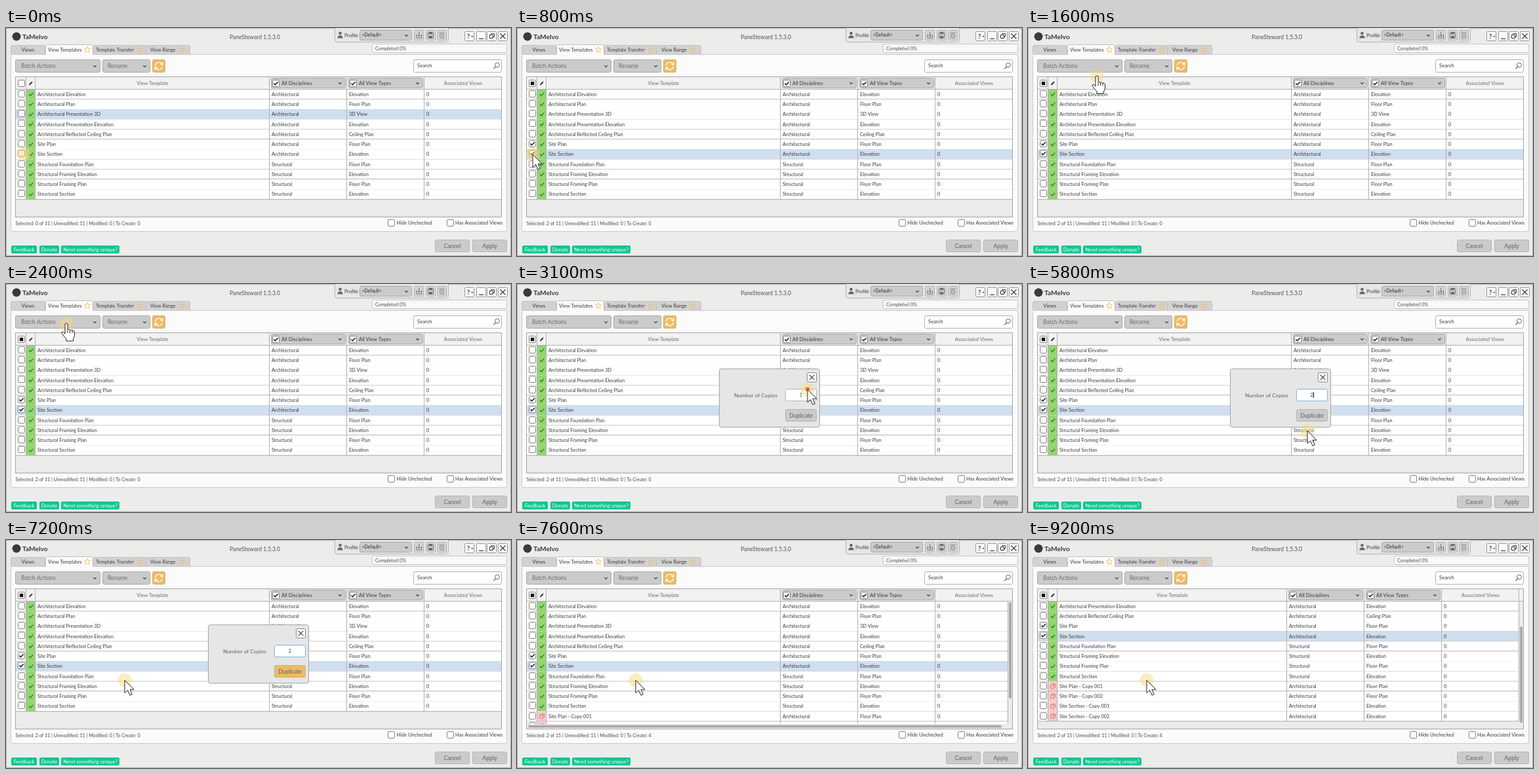
An HTML page with a canvas for the animation above (10000 ms loop, 770 px wide and 348 px high).

```html
<!DOCTYPE html>
<html lang="en">
<head>
<meta charset="utf-8">
<title>View templates</title>
<style>
  html, body { margin: 0; width: 100%; height: 100%; overflow: hidden; background: #ececeb; }
  canvas { display: block; }
</style>
</head>
<body>
<canvas id="stage" width="770" height="348"></canvas>
<script>
const ctx = document.getElementById('stage').getContext('2d');
const LOOP = 10000;
const GREY = '#cbcbcb', ORANGE = '#ecbb62', INK = '#3a3a3a', SOFT = '#6c6c6c', RULE = '#b0b0b0';

// Moments of the hard changes, in ms
const AT = {
  firstCheck: 300, secondCheck: 700, dialogOpen: 2600, focus: 3700, typing: 4200,
  typed: 4800, moveAgain: 5800, hoverDuplicate: 6100, submit: 6300, dialogClose: 7300,
  created: 7500, relayout: 7800, scrolled: 8200
};
const between = (t, from, to) => t >= from && t < to;

const names = [
  'Architectural Elevation', 'Architectural Plan', 'Architectural Presentation 3D',
  'Architectural Presentation Elevation', 'Architectural Reflected Ceiling Plan',
  'Site Plan', 'Site Section', 'Structural Foundation Plan', 'Structural Framing Elevation',
  'Structural Framing Plan', 'Structural Section', 'Site Plan - Copy 001',
  'Site Plan - Copy 002', 'Site Section - Copy 001', 'Site Section - Copy 002'
];
const SITE_PLAN = 5, SITE_SECTION = 6, EXISTING = 11, ROW = 15.27, BODY_TOP = 93.5;

const disciplineOf = name => name.startsWith('Structural') ? 'Structural' : 'Architectural';
const viewTypeOf = name =>
  /3D/.test(name) ? '3D View' :
  /Ceiling/.test(name) ? 'Ceiling Plan' :
  /Elevation|Section/.test(name) ? 'Elevation' : 'Floor Plan';

// Pointer path: time, x, y
const path = [
  [0, 27, 192], [250, 24, 178], [400, 24, 178], [600, 24, 193], [800, 24, 193],
  [1600, 105, 74], [1800, 92, 61], [2800, 92, 61], [3100, 443, 161], [3500, 443, 161],
  [3700, 438, 168], [5799, 438, 168], [5800, 426, 224], [6200, 432, 203],
  [6600, 432, 203], [7100, 181, 214], [LOOP, 181, 214]
];
const clicks = [AT.firstCheck, AT.secondCheck, 1850, 3050, AT.submit];

function pointerAt(t) {
  const i = path.findIndex(p => p[0] > t);
  const [t0, x0, y0] = path[i - 1], [t1, x1, y1] = path[i];
  const u = (t - t0) / (t1 - t0), k = u * u * (3 - 2 * u);
  return [x0 + (x1 - x0) * k, y0 + (y1 - y0) * k];
}

function text(str, x, y, size = 7.35, color = INK, align = 'left', weight = 400) {
  ctx.font = `${weight} ${size}px Lato, sans-serif`;
  ctx.fillStyle = color;
  ctx.textAlign = align;
  ctx.fillText(str, x, y + size * 0.36);
}

// Outlined boxes keep their 1px border inside the given size
function box(x, y, w, h, fill, stroke, radius = 0) {
  const inset = stroke ? 0.5 : 0;
  ctx.beginPath();
  ctx.roundRect(x + inset, y + inset, w - 2 * inset, h - 2 * inset, radius);
  if (fill) { ctx.fillStyle = fill; ctx.fill(); }
  if (stroke) { ctx.strokeStyle = stroke; ctx.lineWidth = 1; ctx.stroke(); }
}

function fillRect(x, y, w, h, color) {
  ctx.fillStyle = color;
  ctx.fillRect(x, y, w, h);
}

function line(points, color = INK, width = 1) {
  ctx.beginPath();
  points.forEach(([x, y]) => ctx.lineTo(x, y));
  ctx.strokeStyle = color;
  ctx.lineWidth = width;
  ctx.stroke();
}

function disc(x, y, r, color) {
  ctx.beginPath();
  ctx.arc(x, y, r, 0, Math.PI * 2);
  ctx.fillStyle = color;
  ctx.fill();
}

const tick = (x, y, color, width = 1.3) =>
  line([[x - 3, y], [x - 1, y + 2.3], [x + 3.2, y - 2.3]], color, width);
const chevron = (x, y) => line([[x - 2.3, y - 1.2], [x, y + 1.2], [x + 2.3, y - 1.2]], INK, 1.1);
const cross = (x, y, r) => {
  line([[x - r, y - r], [x + r, y + r]], '#333', 1.1);
  line([[x - r, y + r], [x + r, y - r]], '#333', 1.1);
};

function checkbox(x, y, state) {
  box(x - 5.5, y - 5.5, 11, 11, '#fff', '#808080', 1);
  if (state === 'some') fillRect(x - 2.7, y - 2.7, 5.4, 5.4, '#111');
  else if (state) tick(x, y, '#111', 1.4);
}

function button(label, x, y, w, h, size, fill = GREY) {
  box(x, y, w, h, fill, '#b4b4b4', 2);
  text(label, x + w / 2, y + h / 2, size, '#606060', 'center');
}

function combo(label, x, y, w, h, textX, size, color) {
  box(x, y, w, h, GREY, '#a8a8a8', 2);
  text(label, textX, y + h / 2, size, color);
  chevron(x + w - 8.5, y + h / 2 + 0.3);
}

function star(x, y) {
  ctx.beginPath();
  for (let i = 0; i < 10; i++) {
    const a = i * Math.PI / 5 - Math.PI / 2, r = i % 2 ? 2.2 : 4.8;
    ctx.lineTo(x + r * Math.cos(a), y + r * Math.sin(a));
  }
  ctx.closePath();
  ctx.strokeStyle = '#ecbd68';
  ctx.lineWidth = 0.9;
  ctx.stroke();
}

function tab(label, x, w, textX, starX, active) {
  box(x, active ? 25 : 26, w, active ? 17 : 15, active ? '#fbfbfb' : '#d2d2d2', '#c2c2c2', 2);
  text(label, textX, 33.2, 7.45);
  if (starX) star(starX, 33.3);
}

function drawTitleBar() {
  disc(16, 13, 6.5, '#3a3a3a');
  text('TaMelvo', 25, 13, 10.2, '#3a3a3a', 'left', 700);
  text('PaneSteward 1.5.3.0', 379.5, 13.5, 8.55, '#505050', 'center');

  box(501, -4, 174, 26, '#e6e6e6', '#b4b4b4', 3);
  disc(509.5, 8, 2.3, '#5d6673');
  ctx.beginPath();
  ctx.arc(509.5, 15.5, 4.2, Math.PI, 0);
  ctx.fill();
  text('Profile', 516, 11.3, 7.4);
  combo('<Default>', 539, 3, 80, 16, 542.5, 6.9, '#2a2a2a');

  for (const x of [622, 640, 657]) box(x, 3, 15, 16, '#d4d4d4', '#b4b4b4', 1);
  line([[626, 10], [626, 15], [633.5, 15], [633.5, 10]], SOFT);
  line([[629.8, 6], [629.8, 12.5]], SOFT);
  line([[627.8, 10.5], [629.8, 12.7], [631.8, 10.5]], SOFT);
  box(643, 6, 9, 10, null, SOFT, 1);
  fillRect(645, 7, 5, 2.5, SOFT);
  fillRect(645, 12, 5, 3.5, SOFT);
  box(661, 8, 7, 8, '#bbb', '#999', 1);
  line([[660, 7], [669, 7]], '#999');

  for (const x of [699, 717, 733, 750]) box(x, 5, 15, 15, '#fafafa', '#999', 1);
  text('?', 703, 12.7, 9.5, '#333', 'left', 700);
  fillRect(709.5, 12, 2.5, 1.3, '#333');
  line([[721, 16.5], [728, 16.5]], '#333', 1.1);
  box(737, 10, 6, 6, null, '#333');
  line([[739.5, 9.5], [739.5, 8.5], [744.5, 8.5], [744.5, 13.5], [743, 13.5]], '#333');
  cross(757.5, 12.5, 4);
}

function drawToolbar() {
  combo('Batch Actions', 14, 48, 130, 20, 23, 8.6, SOFT);
  combo('Rename', 147, 48, 73, 20, 155, 8.6, SOFT);

  box(223, 48, 20, 20, ORANGE, '#d8b06a', 2);
  for (const turn of [0, Math.PI]) {
    ctx.save();
    ctx.translate(233, 58);
    ctx.rotate(turn);
    ctx.beginPath();
    ctx.arc(0, 0, 5.6, Math.PI * 1.05, Math.PI * 1.85);
    ctx.strokeStyle = '#fff';
    ctx.lineWidth = 1.4;
    ctx.stroke();
    line([[6, -6], [6, -2.2], [2.2, -2.2]], '#fff', 1.3);
    ctx.restore();
  }

  box(621, 48, 135, 20, '#fff', '#b0b0b0', 2);
  text('Search', 627, 57.7, 7.7);
  ctx.beginPath();
  ctx.arc(749, 56.5, 3.4, 0, Math.PI * 2);
  ctx.strokeStyle = '#555';
  ctx.lineWidth = 0.9;
  ctx.stroke();
  line([[746.6, 59], [743.3, 62.3]], '#555', 1.1);
}

function drawRow(index, top, right, columns, selected, checked) {
  const name = names[index], mid = top + ROW / 2, isNew = index >= EXISTING;
  fillRect(15, top, right - 15, ROW, selected ? '#d0dfee' : '#fff');
  fillRect(31, top, 14, ROW, isNew ? '#f8c9c9' : '#93d56f');
  checkbox(23.5, Math.floor(mid) - 0.5, checked);
  if (isNew) {
    box(34, mid - 2.5, 6, 6, null, '#d97a7a');
    line([[36, mid - 3.5], [41.5, mid - 3.5], [41.5, mid + 2]], '#d97a7a');
  } else {
    tick(38, mid, '#2d7326', 1.2);
  }
  const cells = [name, disciplineOf(name), viewTypeOf(name), '0'];
  cells.forEach((cell, i) => text(cell, columns[i] + 3, mid, 7.35));
  const bottom = Math.floor(top + ROW) + 0.5;
  line([[15, bottom], [right, bottom]], RULE);
}

function drawTable(t) {
  const created = t >= AT.created, dx = t >= AT.relayout ? -7 : 0;
  const hScroll = created && !dx, scrolled = t >= AT.scrolled;
  const columns = [45, 402 + dx, 520 + dx, 638 + dx];
  const right = 756 + dx, rowRight = created ? 749 : 755;
  const checkedCount = (t >= AT.firstCheck) + (t >= AT.secondCheck);
  const selected = t < AT.firstCheck ? 2 : t < AT.secondCheck ? SITE_PLAN : SITE_SECTION;
  const rowCount = created ? names.length : EXISTING;
  const bodyBottom = hScroll ? 281 : 288;
  const firstTop = BODY_TOP - (scrolled ? 3 * ROW : 0);

  box(14, 74, 742, 215, '#ebebeb', '#a4a4a4');
  fillRect(15, 75, 740, 18, '#f2f2f2');

  ctx.save();
  ctx.beginPath();
  ctx.rect(15, 93, 740, bodyBottom - 93);
  ctx.clip();
  for (let i = scrolled ? 3 : 0; i < rowCount; i++) {
    const checked = i === SITE_PLAN ? checkedCount > 0 : i === SITE_SECTION && checkedCount > 1;
    drawRow(i, firstTop + i * ROW, rowRight, columns, i === selected, checked);
  }
  ctx.restore();

  const rowsBottom = Math.min(bodyBottom, firstTop + rowCount * ROW);
  for (const x of [31, ...columns]) line([[x - 0.5, 75], [x - 0.5, rowsBottom]], RULE);
  if (created) line([[748.5, dx ? 75 : BODY_TOP], [748.5, rowsBottom]], RULE);
  line([[15, 93.5], [755, 93.5]], RULE);

  checkbox(23.5, 84.5, checkedCount ? 'some' : false);
  line([[35.7, 86.5], [40, 82.2]], INK, 2);
  line([[35, 87.2], [36.4, 85.8]], INK, 1);
  text('View Template', (45 + columns[1]) / 2, 84, 7.4, SOFT, 'center');
  ['All Disciplines', 'All View Types'].forEach((label, i) => {
    const x = columns[i + 1];
    combo(label, x + 2, 76, 114, 16, x + 18, 7.65, INK);
    checkbox(x + 9.5, 84.5, true);
  });
  text('Associated Views', (columns[3] + right) / 2, 84, 7.6, SOFT, 'center');

  if (created) box(750, scrolled ? 132 : 95, 4, 147, '#aaa', null, 2);
  if (hScroll) box(17, 282.5, 722, 4, '#aaa', null, 2);

  text(`Selected: ${checkedCount} of ${rowCount} | Unmodified: 11 | Modified: 0 | To Create: ${rowCount - EXISTING}`,
    14.5, 298, 7.1, '#4a4a4a');
}

function drawFooter() {
  checkbox(587.5, 297.5, false);
  text('Hide Unchecked', 595.5, 297.7, 7.5);
  checkbox(677.5, 297.5, false);
  text('Has Associated Views', 685, 297.7, 7.5);

  for (const [label, x, w] of [['Feedback', 8, 39], ['Donate', 51, 30], ['Need something unique?', 84, 89]]) {
    box(x, 332, w, 12, '#0fc592', null, 2);
    text(label, x + w / 2, 338, 7.6, '#fff', 'center');
  }
  button('Cancel', 654, 323, 53, 19, 8.9);
  button('Apply', 711, 323, 53, 19, 8.9);
}

function drawDialog(t) {
  box(308, 129, 154, 90, '#e6e6e6', '#a4a4a4', 3);
  box(442, 135, 15, 15, '#fff', '#888', 1);
  cross(449.5, 142.5, 3.8);
  text('Number of Copies', 331, 169.7, 8.25, '#606060');
  box(409, 160, 48, 19, '#fff', t >= AT.focus ? '#7fb2e0' : '#b4b4b4', 2);
  text(t < AT.typed ? '1' : '2', 433, 169.8, 7.4, INK, 'center');
  const caret = between(t, AT.focus, 4400) || between(t, AT.typed, 5400) || between(t, 5600, AT.submit);
  if (caret) fillRect(435, 165, 1, 9, '#111');
  button('Duplicate', 409, 191, 48, 19, 8.5, t >= AT.hoverDuplicate ? ORANGE : GREY);
}

const arrow = new Path2D('M0 0V19.5L4.5 15.3L8 23L11.3 21.5L8 14.2H14Z');
const hand = new Path2D(
  'M-2 0Q0 -2.6 2 0V9Q4 7.4 5.5 9.5Q7.5 8 9 10.3Q11.5 9.3 12.5 12V18Q12 21 10.5 23V26H0V23' +
  'Q-3 20 -7 14Q-7 11.3 -4.3 12.4L-2 15Z');

function drawPointer(t) {
  if (between(t, AT.typing, AT.moveAgain)) return;
  const [x, y] = pointerAt(t);
  disc(x, y, 10.5, 'rgba(248, 214, 120, 0.47)');
  if (clicks.some(c => Math.abs(t - c) < 100)) disc(x, y - 0.5, 3.2, '#e8743c');
  if (t < 100) return;
  const overButton = between(t, 1200, AT.dialogOpen);
  ctx.save();
  ctx.translate(x, y);
  ctx.fillStyle = '#fff';
  ctx.strokeStyle = '#222';
  ctx.lineWidth = 1;
  ctx.lineJoin = 'round';
  const shape = overButton ? hand : arrow;
  ctx.fill(shape);
  ctx.stroke(shape);
  if (overButton) for (const fx of [2, 5.5, 9]) line([[fx, 10], [fx, 14]], '#222');
  ctx.restore();
}

function draw() {
  const t = performance.now() % LOOP;
  box(0, 0, 770, 348, '#ececeb', '#b0b0b0');
  drawTitleBar();
  tab('Views', 7, 53, 23.5);
  tab('Template Transfer', 133, 80, 137, 204);
  tab('View Range', 212, 69, 220, 268);
  box(7, 40, 757, 271, '#fbfbfb', '#cacaca', 2);
  tab('View Templates', 60, 73, 64, 124, true);
  fillRect(61, 40, 71, 3, '#fbfbfb');
  box(558, 24, 206, 14, '#f8f8f8', '#c8c8c8', 2);
  text('Completed 0%', 563, 31, 7.3, '#505050');
  drawToolbar();
  drawTable(t);
  drawFooter();
  if (between(t, AT.dialogOpen, AT.dialogClose)) drawDialog(t);
  drawPointer(t);
  requestAnimationFrame(draw);
}
draw();
</script>
</body>
</html>
```
